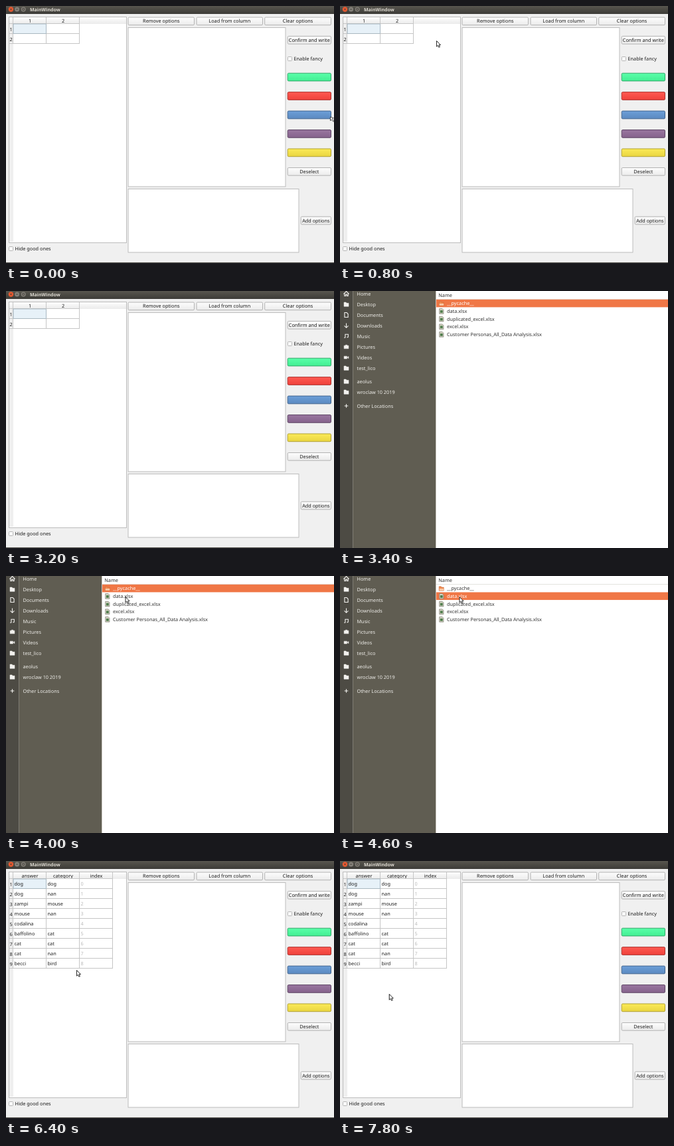
Recreate the animation shown at these times as an HTML page. Size 494x387 px, loop 8000 ms.

```html
<!DOCTYPE html>
<html lang="en">
<head>
<meta charset="utf-8">
<title>Spreadsheet labelling</title>
<style>
html, body { margin: 0; width: 100%; height: 100%; overflow: hidden; background: #f0f0f0; }
svg { display: block; width: 100%; height: 100%; }
text { font: 7.3px "Noto Sans", "Open Sans", sans-serif; fill: #1c1c1c; text-rendering: geometricPrecision; white-space: pre; }
.mid { text-anchor: middle; }
.faint { fill: #bcbcbc; }
.side { fill: #eeede9; }
.file { fill: #333; }
.title { font-size: 7px; font-weight: 700; fill: #dfdbd2; }
.line { fill: none; stroke: #c6c6c6; }
.icon { fill: none; stroke: #f2f1ee; stroke-width: 1.1; }

.anim { animation: 8s step-end infinite; }
#dialog { animation-name: dialog; }
#empty { animation-name: empty; }
#filled { animation-name: filled; }
#pick1 { animation-name: pick1; }
#pick2 { animation-name: pick2; }
#resize { animation-name: resize; }
#arrow { animation-name: arrow; }
.close { animation-name: close; }
.title { animation-name: fade; }
.cell { animation-name: cell; }

@keyframes dialog { 0%, 62.5% { visibility: hidden } 42.5% { visibility: visible } }
@keyframes empty { 0% { visibility: visible } 62.5% { visibility: hidden } }
@keyframes filled { 0% { visibility: hidden } 62.5% { visibility: visible } }
@keyframes pick1 { 0%, 57.5% { opacity: 0 } 42.5% { opacity: 1 } }
@keyframes pick2 { 0%, 62.5% { opacity: 0 } 57.5% { opacity: 1 } }
@keyframes resize { 0% { opacity: 1 } 2.5% { opacity: 0 } }
@keyframes close { 0%, 37.5% { fill: #ee5b31 } 27.5% { fill: #85807a } }
@keyframes fade { 0%, 37.5% { fill: #dfdbd2 } 27.5% { fill: #b5b1a9 } }
@keyframes cell { 0%, 40% { fill: #e7f1f8; stroke: #9fb0bb } 32.5% { fill: #f2f6f9; stroke: #c6c6c6 } }
@keyframes arrow {
  0%, 22.5% { transform: translate(-30px, -30px) }
  2.5% { transform: translate(468px, 177px) }
  5% { transform: translate(396px, 154px) }
  7.5% { transform: translate(270px, 103px) }
  10% { transform: translate(145px, 52px) }
  12.5% { transform: translate(67px, 16px) }
  15% { transform: translate(43px, 4px) }
  45% { transform: translate(90px, 1px) }
  47.5% { transform: translate(152px, 19px) }
  50% { transform: translate(179.5px, 31px) }
  72.5% { transform: translate(173px, 44px) }
  75% { transform: translate(153px, 81px) }
  77.5% { transform: translate(127px, 127px) }
  80% { transform: translate(106px, 164px) }
  82.5% { transform: translate(92px, 184px) }
  85% { transform: translate(87px, 191px) }
  87.5% { transform: translate(83px, 201px) }
  90% { transform: translate(78px, 209px) }
  92.5% { transform: translate(77px, 205px) }
  97.5% { transform: translate(73.7px, 200px) }
}
</style>
</head>
<body>
<svg id="stage" viewBox="0 0 494 387" preserveAspectRatio="none"></svg>
<script>
const rect = (x, y, w, h, fill, extra = '') =>
  `<rect x="${x}" y="${y}" width="${w}" height="${h}" fill="${fill}" ${extra}/>`;
const text = (x, y, label, cls = '') => `<text x="${x}" y="${y}" class="${cls}">${label}</text>`;
const path = (d, extra = 'class="icon"') => `<path d="${d}" ${extra}/>`;
const group = (id, body) => `<g id="${id}" class="anim">${body}</g>`;
const frame = (x, y, w, h) => rect(x + .5, y + .5, w - 1, h - 1, '#fff', 'stroke="#bcbcbc"');

const gradient = (id, top, bottom) =>
  `<linearGradient id="${id}" x2="0" y2="1"><stop stop-color="${top}"/><stop offset="1" stop-color="${bottom}"/></linearGradient>`;

const button = (x, y, w, label, fill = 'url(#plain)', edge = '#b3b3b3') =>
  rect(x + .5, y + .5, w - 1, 11.7, fill, `stroke="${edge}" rx="1.5"`) +
  text(x + w / 2, y + 8.9, label, 'mid');

const checkbox = (x, y, label) =>
  rect(x + .5, y + .5, 6, 6, '#fff', 'stroke="#b5b5b5" rx=".8"') + text(x + 9.5, y + 6.1, label);

const colors = [
  ['green', '#5affa9', '#43ee93', '#2fa968'],
  ['red', '#ff5a52', '#ee413b', '#ad302c'],
  ['blue', '#6d9fd8', '#5a89c0', '#40648d'],
  ['purple', '#99769f', '#85628c', '#5f4765'],
  ['yellow', '#fbea58', '#e9d540', '#b0a130'],
];

// Header strips, grid and cell labels; index cells are shown faint.
function table(columns, rows) {
  const right = 11 + columns.length * 50, bottom = 27 + rows.length * 15;
  let out = rect(5, 17, 176, 10, 'url(#plain)') + rect(5, 27, 6, 328, '#efefef');
  columns.forEach((name, c) => {
    const x = 61 + c * 50;
    out += text(x - 25, 25, name, 'mid') + path(`M${x - .5} 17V${bottom}`, 'class="line"');
  });
  rows.forEach((row, r) => {
    const y = 27 + r * 15;
    out += path(`M5 ${y + 14.5}H${right}`, 'class="line"') + text(7.7, y + 10.6, r + 1, 'mid');
  });
  out += path(`M5 26.5H${right}M10.5 17V${bottom}`, 'class="line"') +
    rect(11, 27, 49.5, 14.5, '#e7f1f8', 'class="cell anim" stroke="#9fb0bb" stroke-width=".8"');
  rows.forEach((row, r) => row.forEach((value, c) => {
    out += text(12.6 + c * 50, 37.4 + r * 15, value, c === 2 ? 'faint' : '');
  }));
  return out;
}

const answers = ['dog dog', 'dog nan', 'zampi mouse', 'mouse nan', 'codalina ',
  'baffolino cat', 'cat cat', 'cat nan', 'becci bird'].map((pair, i) => [...pair.split(' '), i]);

const titleBar = rect(0, 0, 494, 12, 'url(#bar)') +
  '<circle cx="7.5" cy="5" r="3.7" fill="#ee5b31" class="close anim"/>' +
  '<circle cx="16.6" cy="5" r="3.5" fill="#85817a"/><circle cx="26.2" cy="5" r="3.5" fill="#85817a"/>' +
  path('M6 3.5l3 3m0-3l-3 3M15 5h3.2M24.8 3.6h2.8v2.8h-2.8z', 'fill="none" stroke="#3b3934" stroke-width=".8"') +
  text(36, 7.8, 'MainWindow', 'title anim');

const mainWindow = rect(0, 0, 494, 387, '#f0f0f0') + titleBar + frame(4, 16, 178, 341) +
  group('empty', table([1, 2], [[], []])) +
  group('filled', table(['answer', 'category', 'index'], answers)) +
  button(183.5, 16.5, 100.5, 'Remove options') +
  button(286.5, 16.5, 100.5, 'Load from column') +
  button(389.2, 16.5, 100.8, 'Clear options') +
  frame(183.5, 32, 238, 240.5) + frame(183.5, 275, 258, 96.5) +
  button(423.7, 45, 66.3, 'Confirm and write') + checkbox(424, 76, 'Enable fancy') +
  colors.map(([id, , , edge], i) => button(423.7, 100.7 + i * 28.45, 66.3, '', `url(#${id})`, edge)).join('') +
  button(423.7, 243, 66.3, 'Deselect') + button(443.7, 316.7, 46.3, 'Add options') +
  checkbox(4, 362, 'Hide good ones') + rect(0, 386, 494, 1, '#55534e');

const folder = 'M-3.5-3h3l1 1.3h3v5h-7z';
const glyphs = {
  home: 'M-4 .5L0-3.5L4 .5M-2.7 0v3.5h1.8V1h1.8v2.5h1.8V0',
  doc: 'M-2.6-3.5h3.2l2 2v5h-5.2z',
  down: 'M0-3.5v6.5M-3 .4L0 3.3L3 .4',
  music: 'M-1.6 2.4v-5.2h4.4v4.4M-3.4 2.3h1.8M1 1.6h1.8',
  camera: 'M-3.4-1.8h1.8l.6-1h2l.6 1h1.8v4.6h-6.8zM-1 .4h2',
  video: 'M-3.4-1.8h4.4v3.8h-4.4zM1.4 0l2-1.6v3.4z',
  folder,
  plus: 'M-2.8 0h5.6M0-2.8v5.6',
};
const places = [
  ['Home', 4, 'home'], ['Desktop', 20, 'folder'], ['Documents', 36, 'doc'], ['Downloads', 52, 'down'],
  ['Music', 68, 'music'], ['Pictures', 84, 'camera'], ['Videos', 100, 'video'], ['test_lico', 116, 'folder'],
  ['aeolus', 136, 'folder'], ['wroclaw 10 2019', 152, 'folder'], ['Other Locations', 173, 'plus'],
];
const solid = ['folder', 'video', 'camera'];
const placeList = places.map(([label, y, glyph]) =>
  `<g transform="translate(9.5 ${y})">` +
  path(glyphs[glyph], `class="icon"${solid.includes(glyph) ? ' style="fill:#f2f1ee;stroke-width:.5"' : ''}`) +
  '</g>' + text(25.5, y + 2.5, label, 'side')).join('');

const files = ['__pycache__', 'data.xlsx', 'duplicated_excel.xlsx', 'excel.xlsx',
  'Customer Personas_All_Data Analysis.xlsx'];
const rowTop = i => 12.8 + i * 11.65;
const fileIcon = i => `<g transform="translate(152.7 ${rowTop(i) + 6})">` + (i
  ? path('M-3-3.8h4.4l1.8 1.8v5.8h-6.2z', 'fill="#d9d8c8" stroke="#77776a" stroke-width=".7"') +
    rect(-1.8, -1.4, 3.8, 3.8, '#4f7d4c')
  : path(folder, 'fill="#ef8a50" stroke="#c9683a" stroke-width=".6"') +
    path('M-3 .2h6.5v2.8h-6.5z', 'fill="#f8c9a8"')) + '</g>';
const fileName = (i, cls) => text(161, rowTop(i) + 8.4, files[i], cls);
const highlight = i => rect(145, rowTop(i), 349, 11.6, '#f07746') + fileIcon(i) +
  `<g style="--w:1">${fileName(i, '" style="fill:#fff')}</g>`;

const dialog = rect(0, 0, 494, 387, '#fff') +
  rect(0, 0, 19.3, 387, '#4d4b44') + rect(19.3, 0, 125, 387, '#605d52') + placeList +
  rect(144, 0, 1, 387, '#c9c6bf') + text(148.3, 8.5, 'Name', 'file') + rect(145, 12, 349, .8, '#dedcd8') +
  files.map((_, i) => fileIcon(i) + fileName(i, 'file')).join('') +
  group('pick1', highlight(0)) + group('pick2', highlight(1));

const pointer = path('M.5 .5v8.6l2-1.8 1.4 3 1.5-.7-1.4-2.9h2.5z',
  'fill="#fff" stroke="#111" stroke-width=".9" stroke-linejoin="round"');
const resizer = path('M488.5 167.2l4.8 1.4-1.8 1.2 2.5 3.6-1 .9-3-3.2-1.5 1.6z',
  'fill="#fff" stroke="#222" stroke-width=".8"');

document.getElementById('stage').innerHTML =
  '<defs>' + gradient('bar', '#58564f', '#3c3b37') + gradient('plain', '#fdfdfd', '#ebebeb') +
  colors.map(([id, top, bottom]) => gradient(id, top, bottom)).join('') + '</defs>' +
  mainWindow + group('dialog', dialog) + group('resize', resizer) + group('arrow', pointer);
</script>
</body>
</html>
```
